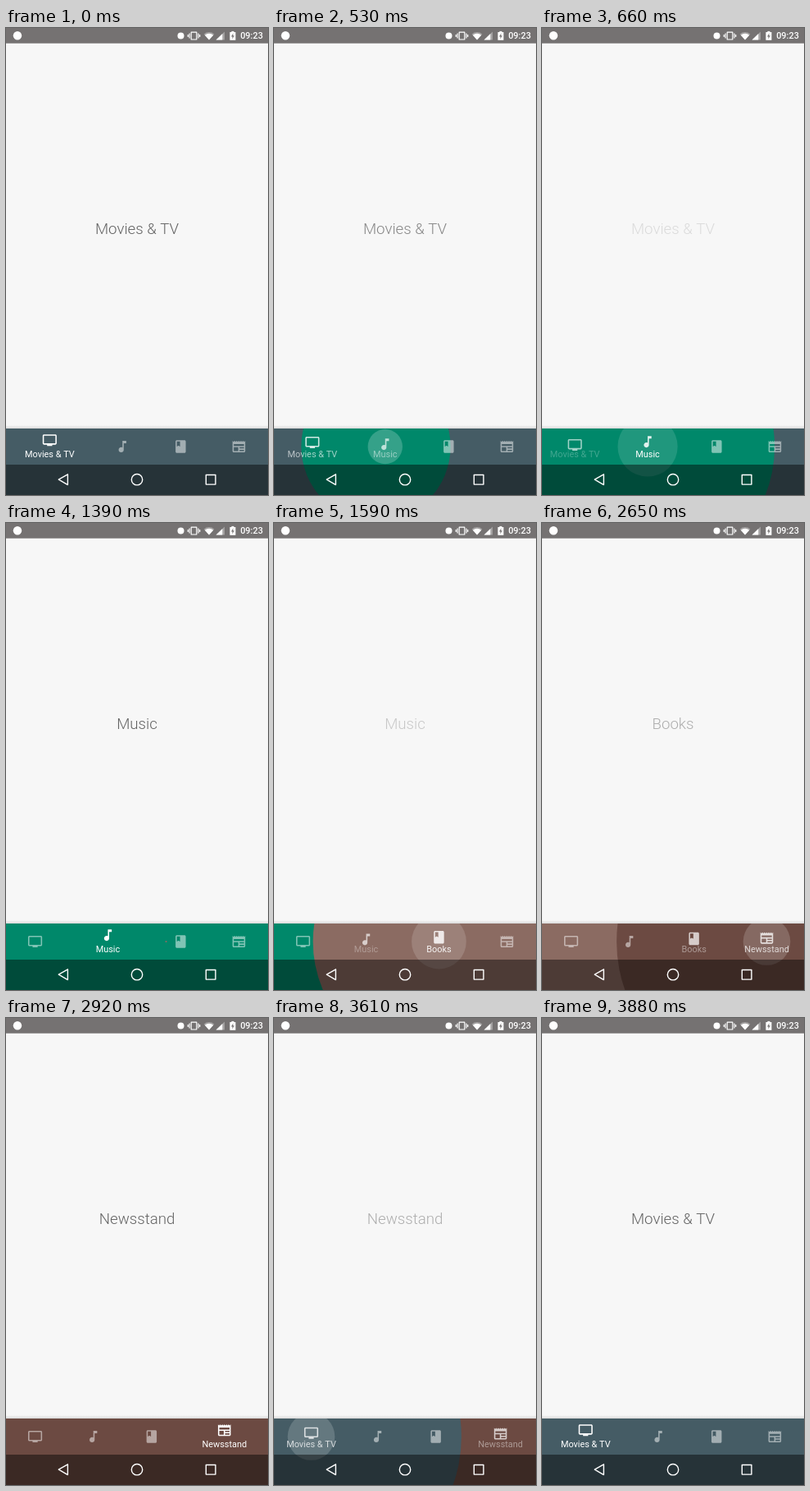
Animation, 320 px wide and 569 px high, one loop 3.94 s. Source, as an HTML page with a canvas:

```html
<!DOCTYPE html>
<html lang="en">
<head>
<meta charset="utf-8">
<title>Bottom navigation</title>
<style>
  html, body { margin: 0; width: 100%; height: 100%; overflow: hidden; background: #f7f7f7; }
  canvas { display: block; width: 320px; height: 569px; }
</style>
</head>
<body>
<canvas id="stage"></canvas>
<script>
const W = 320, H = 569, LOOP = 3940;
const BAR = 488, NAV = 532, DP = 7 / 9, UNIT = W / 4.5;
const STARTS = [430, 1390, 2490, 3450], LENGTH = 470;

const TABS = [
  { name: 'Movies & TV', color: '#455c65',
    icon: 'M21 3H3c-1.1 0-2 .9-2 2v12c0 1.1.9 2 2 2h5v2h8v-2h5c1.1 0 2-.9 2-2V5c0-1.1-.9-2-2-2zm0 14H3V5h18z' },
  { name: 'Music', color: '#00886a',
    icon: 'M12 3v10.55c-.59-.34-1.27-.55-2-.55-2.21 0-4 1.79-4 4s1.79 4 4 4 4-1.79 4-4V7h4V3z' },
  { name: 'Books', color: '#8b6b62',
    icon: 'M18 2H6c-1.1 0-2 .9-2 2v16c0 1.1.9 2 2 2h12c1.1 0 2-.9 2-2V4c0-1.1-.9-2-2-2zM6 4h5v8l-2.5-1.5L6 12z' },
  { name: 'Newsstand', color: '#6c4a42',
    icon: 'M2 3' + 'l1.67 1.67 1.66-1.67'.repeat(6) +
      'V19c0 1.1-.9 2-2 2H4c-1.1 0-2-.9-2-2zM4 8h16v3H4zM4 13h7v6H4zM13 13h7v2h-7zM13 17h7v2h-7z' }
].map(tab => ({ ...tab, shape: new Path2D(tab.icon) }));

const canvas = document.getElementById('stage');
const ctx = canvas.getContext('2d');
const ratio = window.devicePixelRatio || 1;
canvas.width = W * ratio;
canvas.height = H * ratio;

const clamp = v => Math.max(0, Math.min(1, v));
const mix = (a, b, k) => a + (b - a) * k;
const white = a => `rgba(255,255,255,${a})`;
const easeOut = (u, power) => 1 - (1 - clamp(u)) ** power;

// Center of tab i while the given tab is the wide one.
function tabCenter(i, active) {
  return UNIT * (i + (i > active ? 1 : i === active ? 0.75 : 0.5));
}

function rect(x, y, w, h, fill) {
  ctx.fillStyle = fill;
  ctx.fillRect(x, y, w, h);
}

function disc(x, y, r, fill) {
  ctx.fillStyle = fill;
  ctx.beginPath();
  ctx.arc(x, y, r, 0, Math.PI * 2);
  ctx.fill();
}

function poly(points, close = true) {
  ctx.beginPath();
  points.forEach(([x, y]) => ctx.lineTo(x, y));
  if (close) ctx.closePath();
}

function label(text, x, y, font, fill) {
  ctx.font = font + ' Roboto, sans-serif';
  ctx.textAlign = 'center';
  ctx.fillStyle = fill;
  ctx.fillText(text, x, y);
}

function drawStatus() {
  rect(0, 0, W, 18.7, '#757272');
  disc(14, 9.3, 5.2, '#fff');
  disc(213.5, 9.5, 4, '#fff');

  // vibrate
  ctx.strokeStyle = '#fff';
  ctx.lineWidth = 1.2;
  ctx.strokeRect(226.2, 5.2, 6.6, 8.8);
  for (const side of [-1, 1]) {
    const x = 229.5 + side * 5.4;
    poly([[x, 6.5], [x, 12.5]], false);
    ctx.stroke();
    poly([[x + side * 1.8, 8], [x + side * 1.8, 11]], false);
    ctx.stroke();
  }

  // wifi
  const fan = (r, fill) => {
    ctx.fillStyle = fill;
    ctx.beginPath();
    ctx.moveTo(248, 14.6);
    ctx.arc(248, 14.6, r, -Math.PI * 0.73, -Math.PI * 0.27);
    ctx.fill();
  };
  fan(9.6, white(0.35));
  fan(7.8, '#fff');

  // signal
  poly([[256.5, 14.5], [267, 4.5], [267, 14.5]]);
  ctx.fillStyle = white(0.35);
  ctx.fill();
  poly([[256.5, 14.5], [264.3, 7], [264.3, 14.5]]);
  ctx.fillStyle = '#fff';
  ctx.fill();

  // battery
  rect(273.4, 5, 7, 9.8, '#fff');
  rect(275.4, 3.9, 3, 1.2, '#fff');
  poly([[277.5, 6.2], [275, 10.4], [276.6, 10.4], [276.3, 13.4], [278.8, 9.2], [277.2, 9.2]]);
  ctx.fillStyle = '#757272';
  ctx.fill();

  label('09:23', 300, 13.3, '500 10.9px', '#fff');
}

function drawNavButtons() {
  rect(0, NAV, W, H - NAV, 'rgba(0,0,0,.45)');
  ctx.strokeStyle = '#fff';
  ctx.lineWidth = 1.4;
  ctx.lineJoin = 'round';
  poly([[64.3, 550.2], [75.4, 543.8], [75.4, 556.6]]);
  ctx.stroke();
  ctx.beginPath();
  ctx.arc(160, 550.2, 6.7, 0, Math.PI * 2);
  ctx.stroke();
  ctx.strokeRect(244.3, 544.5, 11.6, 11.6);
}

function drawTab(i, from, to, p) {
  const tab = TABS[i];
  const x = mix(tabCenter(i, from), tabCenter(i, to), p);
  const on = mix(i === from ? 1 : 0, i === to ? 1 : 0, p);

  ctx.save();
  ctx.translate(x - 12 * DP, mix(510, 502.2, on) - 12 * DP);
  ctx.scale(DP, DP);
  ctx.fillStyle = white(mix(0.5, 1, on));
  ctx.fill(tab.shape, 'evenodd');
  ctx.restore();

  const alpha = i === to ? clamp(on * 1.35) : on;
  if (alpha > 0) label(tab.name, x, 523.3, '400 10.9px', white(alpha));
}

function drawBar(from, to, t) {
  const p = easeOut((t - 10) / 450, 2);

  const shadow = ctx.createLinearGradient(0, BAR - 4, 0, BAR);
  shadow.addColorStop(0, 'rgba(0,0,0,0)');
  shadow.addColorStop(1, 'rgba(0,0,0,.12)');
  rect(0, BAR - 4, W, 4, shadow);

  ctx.save();
  ctx.beginPath();
  ctx.rect(0, BAR, W, H - BAR);
  ctx.clip();
  rect(0, BAR, W, H - BAR, TABS[t >= 420 ? to : from].color);
  if (t > 0 && t < 420) {
    const c = tabCenter(to, to);
    disc(c, 510, Math.max(c, W - c) * easeOut(t / 535, 3), TABS[to].color);
  }
  if (t > 0 && t < 430) {
    const x = mix(tabCenter(to, from), tabCenter(to, to), p);
    const alpha = 0.27 * (1 - t / 430) * clamp(t / 60);
    disc(x, 510, 36.5 * (t / 230) ** 0.66, white(alpha));
  }
  ctx.restore();

  TABS.forEach((_, i) => drawTab(i, from, to, p));
}

function drawTitle(from, to, t) {
  const leaving = t < 275;
  const alpha = leaving ? 1 - clamp((t - 45) / 230) : clamp((t - 275) / 155);
  label(TABS[leaving ? from : to].name, 160, 251.3, '300 18.67px', `rgba(0,0,0,${0.6 * alpha})`);
}

function draw(time) {
  const step = STARTS.filter(s => s <= time).length;
  const from = (step + 3) % 4, to = step % 4;
  const t = step ? Math.min(time - STARTS[step - 1], LENGTH) : LENGTH;

  ctx.setTransform(ratio, 0, 0, ratio, 0, 0);
  rect(0, 0, W, H, '#f7f7f7');
  drawStatus();
  drawTitle(from, to, t);
  drawBar(from, to, t);
  drawNavButtons();
}

const begin = performance.now();
function tick() {
  draw((performance.now() - begin) % LOOP);
  requestAnimationFrame(tick);
}
tick();
</script>
</body>
</html>
```
